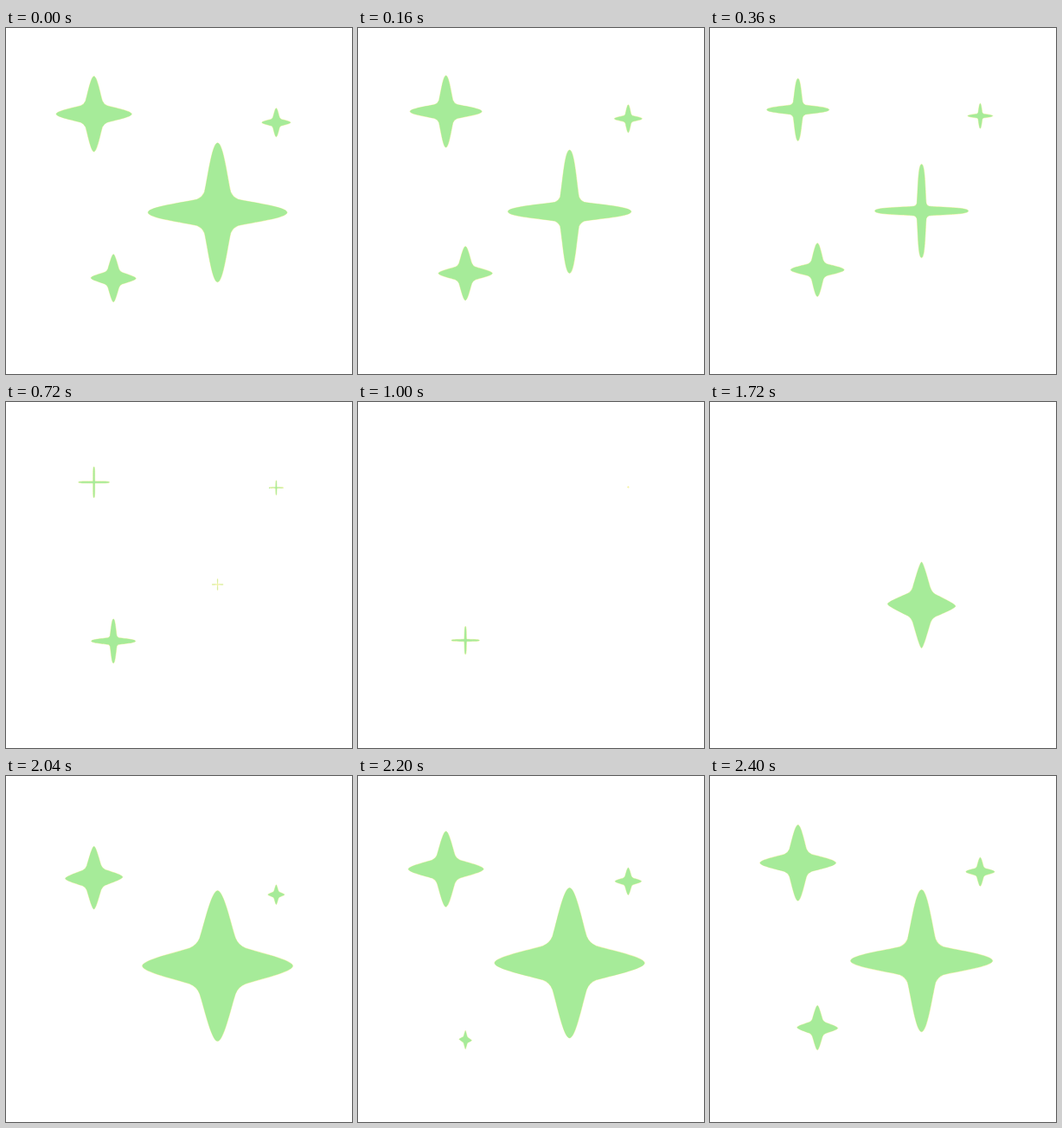
These frames come from a looping animation (400x400 px, 2440 ms). An HTML page with a canvas:

```html
<!DOCTYPE html>
<html lang="en">
<head>
<meta charset="utf-8">
<title>Sparkles</title>
<style>
  html, body { margin: 0; width: 100%; height: 100%; overflow: hidden; background: #fff; }
  canvas { display: block; width: 400px; height: 400px; }
</style>
</head>
<body>
<canvas id="stage" width="400" height="400"></canvas>
<script>
const LOOP = 2440, STEP = 40;
const GROWN = 500, FADE = 600, LIFE = 1660;   // ages in ms
const FILL = '#a6eb99', EDGE = '#f8f2a8';
const ctx = document.getElementById('stage').getContext('2d');

// x, resting y, full radius, start time, rise distance, shear
const stars = [
  { x: 244.6, y: 210.7, size: 87,   birth: 1540, rise: 42, shear: .12 },
  { x: 101.7, y: 92,    size: 44,   birth: 1740, rise: 65, shear: -.3 },
  { x: 312.4, y: 97.9,  size: 16.6, birth: 1810, rise: 80, shear: 0 },
  { x: 124.2, y: 274.9, size: 31.2, birth: 2100, rise: 41, shear: .2 }
];

const progress = (age, from, to) => Math.min(1, Math.max(0, (age - from) / (to - from)));
const easeOut = (p, power) => 1 - (1 - p) ** power;

// Grow with an ease-out, then thin to a cross while shrinking
function pose(age) {
  const grow = progress(age, 0, GROWN);
  const scale = easeOut(grow, 1.9);
  const reach = scale * (1 - progress(age, FADE, LIFE) ** 2.05);
  const thin = (1 + Math.cos(Math.PI * progress(age, GROWN, LIFE))) / 2;
  const turn = 1 - .49 * (1 - scale);
  return {
    reach, turn,
    waist: .29 * easeOut(grow, 2.2) * thin,
    tip: .08 * reach * turn ** 2,
    lift: Math.exp(-.0031 * age)
  };
}

function starPath(reach, waist, tip) {
  const path = new Path2D();
  const ax = waist * .82, ay = waist * 1.28;      // arm foot
  const cx = ax - waist * .2, cy = ay + (reach - ay) * .28;
  path.moveTo(0, -reach);
  for (let k = 0; k < 4; k++) {
    const rot = (x, y) => [[x, y], [-y, x], [-x, -y], [y, -x]][k];
    path.bezierCurveTo(...rot(tip, -reach), ...rot(cx, -cy), ...rot(ax, -ay));
    path.quadraticCurveTo(...rot(waist * .95, -waist * .95), ...rot(ay, -ax));
    path.bezierCurveTo(...rot(cy, -cx), ...rot(reach, -tip), ...rot(reach, 0));
  }
  path.closePath();
  return path;
}

function drawStar({ x, y, size, birth, rise, shear }, time) {
  const age = (time - birth + LOOP) % LOOP;
  if (age <= 0 || age >= LIFE) return;
  const { reach, turn, waist, tip, lift } = pose(age);
  const path = starPath(reach * size, waist * size, tip * size);
  ctx.setTransform(turn, shear * (1 - turn), 0, 1, x, y + rise * lift);
  ctx.stroke(path);
  ctx.fill(path);
}

function frame(now) {
  const time = Math.floor((now % LOOP) / STEP) * STEP;
  ctx.setTransform(1, 0, 0, 1, 0, 0);
  ctx.fillStyle = '#fff';
  ctx.fillRect(0, 0, 400, 400);
  ctx.fillStyle = FILL;
  ctx.strokeStyle = EDGE;
  ctx.lineWidth = .9;
  ctx.lineJoin = 'round';
  stars.forEach(s => drawStar(s, time));
}

const start = performance.now();
function tick() {
  frame(performance.now() - start);
  requestAnimationFrame(tick);
}
tick();
</script>
</body>
</html>
```
